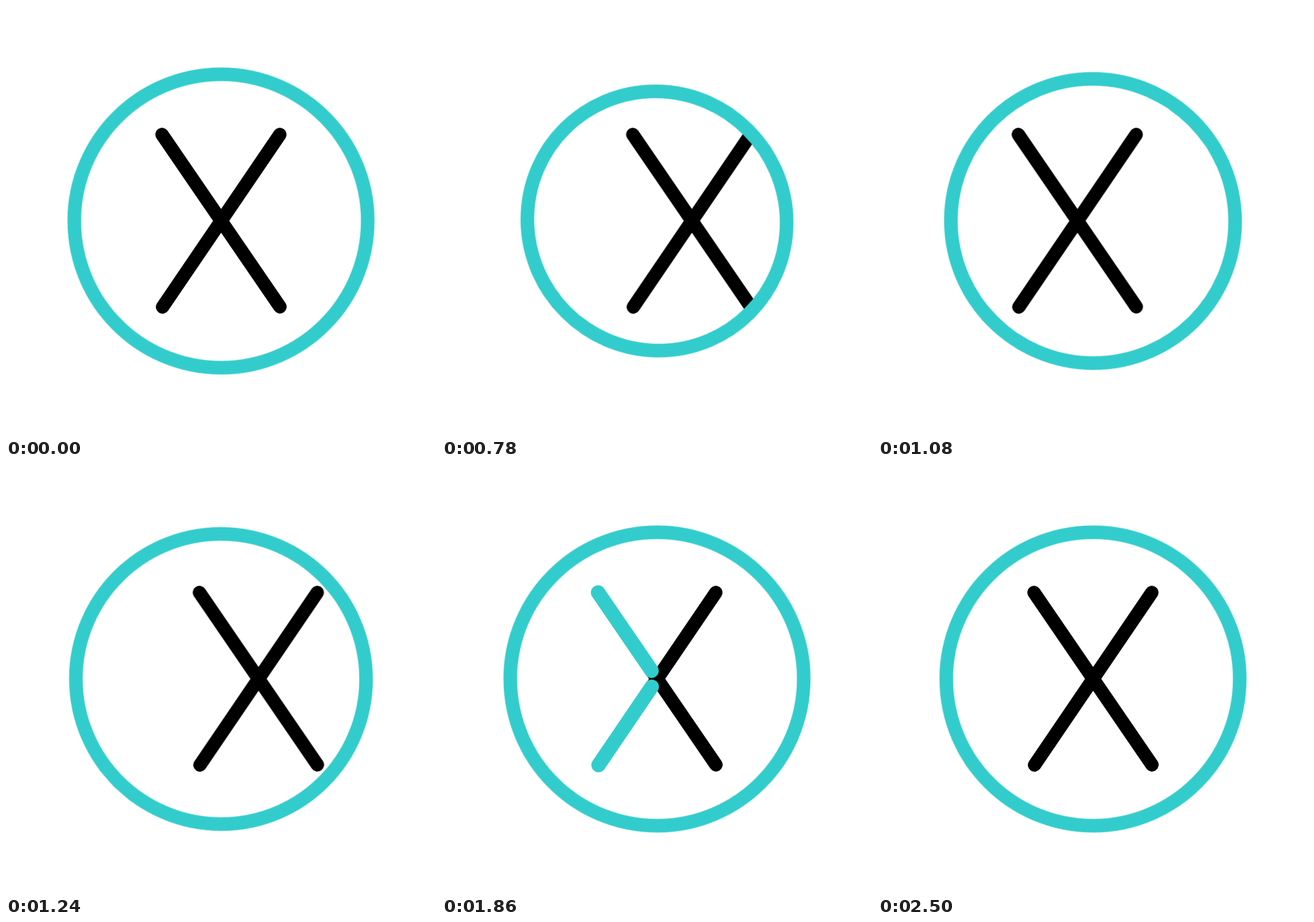
An HTML page for the animation above (2.72 s loop, 640 by 640 pixels).

```html
<!DOCTYPE html>
<html lang="en">
<head>
<meta charset="utf-8">
<title>Cross in a ring</title>
<style>
  html, body { margin: 0; width: 100%; height: 100%; overflow: hidden; background: #fff; }
  svg { display: block; width: 100%; height: 100%; }
  line, .ring { fill: none; stroke-linecap: round; }
  .cross { stroke: #000; stroke-width: 20; }
  .tint { stroke: #3cc; stroke-width: 21.5; }
  .ring { stroke: #3cc; stroke-width: 20.3; }

  .ring, .hole { rx: 218.4px; ry: 218.4px; animation: squeeze 2720ms linear infinite; }
  .slide { animation: slide 2720ms linear infinite; }
  .tint { animation: fade 2720ms linear infinite; }
  .tint line { stroke-dasharray: 1 2; stroke-dashoffset: 1; animation: draw 2720ms linear infinite; }

  @keyframes squeeze {
    0% { rx: 218.4px; ry: 218.4px; }
    7.3% { rx: 218.4px; ry: 218.4px; animation-timing-function: cubic-bezier(.3, 1, .6, 1); }
    23.16% { rx: 178.9px; ry: 174.7px; animation-timing-function: cubic-bezier(.333, 1, .667, 1); }
    59.93%, 100% { rx: 218.4px; ry: 218.4px; }
  }
  /* The second cross trails by 355px, so the end pose equals the start pose. */
  @keyframes slide {
    0% { transform: translateX(0); }
    23.79% { transform: translateX(0); animation-timing-function: cubic-bezier(.333, 0, .667, 1); }
    45.99% { transform: translateX(411px); animation-timing-function: cubic-bezier(.333, 0, .667, 1); }
    60.29%, 100% { transform: translateX(355px); }
  }
  @keyframes draw {
    0% { stroke-dashoffset: 1; }
    60.66% { stroke-dashoffset: 1; animation-timing-function: cubic-bezier(.333, 0, .667, 1); }
    77.2%, 100% { stroke-dashoffset: 0; }
  }
  @keyframes fade {
    0%, 60.65% { opacity: 0; }
    60.66% { opacity: 1; }
    77.2% { opacity: 1; animation-timing-function: cubic-bezier(.333, 0, .667, 1); }
    91.9%, 100% { opacity: 0; }
  }
</style>
</head>
<body>
<svg viewBox="0 0 640 640">
  <defs>
    <clipPath id="inside">
      <ellipse class="hole" cx="320" cy="320" transform="rotate(45 320 320)"/>
    </clipPath>
    <g id="cross">
      <line pathLength="1" x1="232.3" y1="191.3" x2="407.7" y2="447.7"/>
      <line pathLength="1" x1="233" y1="448" x2="407.5" y2="191.3"/>
    </g>
  </defs>
  <g clip-path="url(#inside)">
    <g class="cross slide">
      <use href="#cross"/>
      <use href="#cross" x="-355"/>
    </g>
  </g>
  <g class="tint">
    <line pathLength="1" x1="232.3" y1="191.3" x2="407.7" y2="447.7"/>
    <line pathLength="1" x1="233" y1="448" x2="407.5" y2="191.3"/>
  </g>
  <ellipse class="ring" cx="320" cy="320" transform="rotate(45 320 320)"/>
</svg>
</body>
</html>
```
